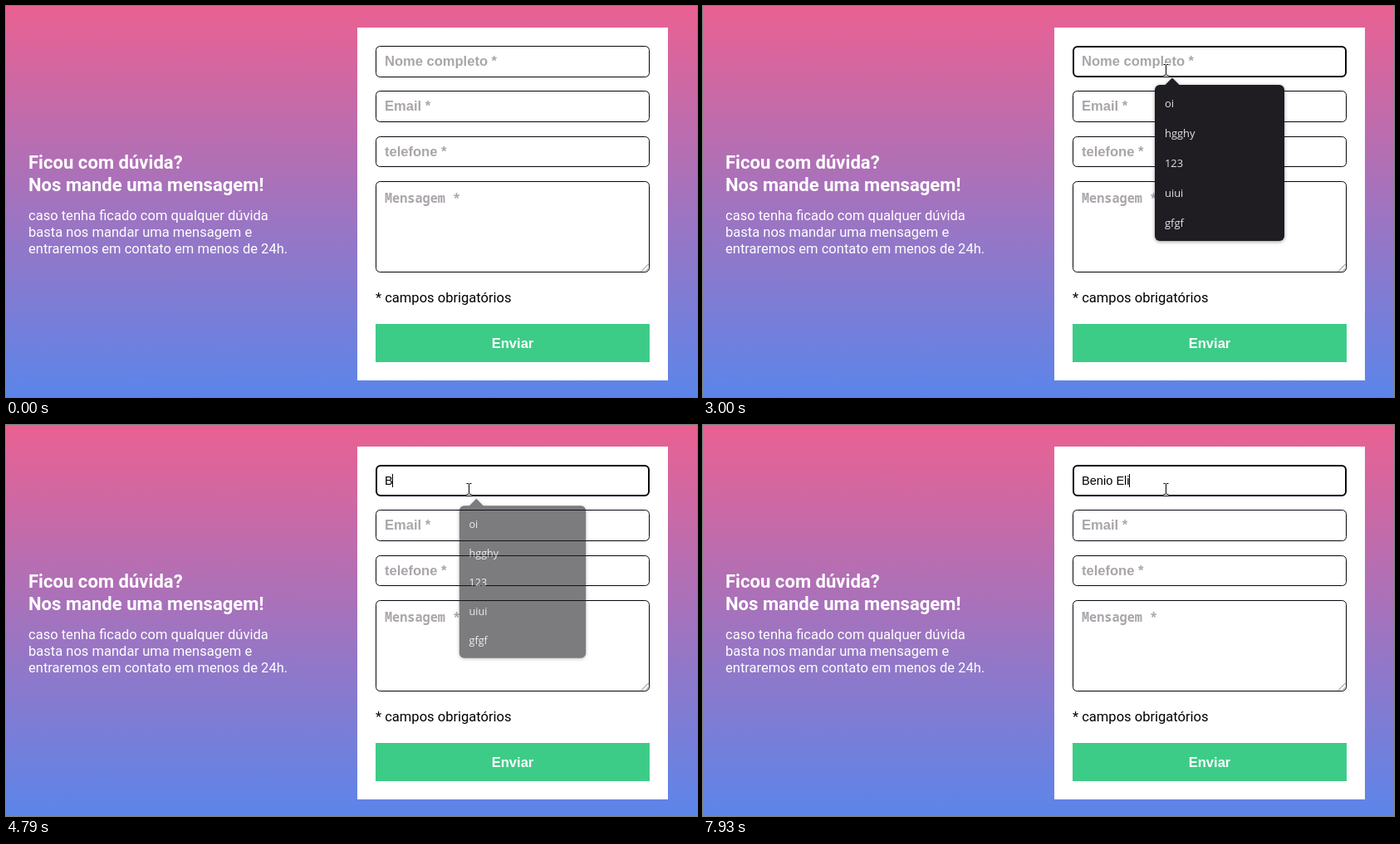
An HTML page that plays this animation: 832 px wide and 471 px high, repeating every 8 s.

```html
<!DOCTYPE html>
<html lang="pt-BR">
<head>
<meta charset="utf-8">
<title>Formulário de contato</title>
<style>
html, body { margin: 0; width: 100%; height: 100%; overflow: hidden; }
svg { display: block; width: 832px; height: 471px; }
text { white-space: pre; }
.copy { font: 16.55px Roboto, sans-serif; }
.title { font: 700 22.1px Roboto, sans-serif; }
.label { font: 700 16.55px "Liberation Sans", Arial, sans-serif; }
.mono { font: 700 15.2px "Noto Sans Mono", monospace; }
.typed { font: 14.6px "Liberation Sans", Arial, sans-serif; }
.option { font: 12.9px "Open Sans", "Noto Sans", sans-serif; }
.hint { fill: #aaa5aa; }
.field { fill: none; stroke: #05050f; }
#popup { transform-origin: 622px 189px; filter: drop-shadow(0 1px 2px #0006); }
</style>
</head>
<body>
<svg viewBox="0 0 832 471">
  <defs>
    <linearGradient id="sky" x2="0" y2="1">
      <stop stop-color="#ea6192"/>
      <stop offset="1" stop-color="#5b85ea"/>
    </linearGradient>
  </defs>
  <rect width="832" height="471" fill="url(#sky)"/>
  <g fill="#fff">
    <text class="title" x="27" y="196">Ficou com dúvida?</text>
    <text class="title" x="27" y="223">Nos mande uma mensagem!</text>
    <text class="copy" x="27" y="258">caso tenha ficado com qualquer dúvida</text>
    <text class="copy" x="27" y="278">basta nos mandar uma mensagem e</text>
    <text class="copy" x="27" y="298">entraremos em contato em menos de 24h.</text>
    <rect x="423" y="26" width="374" height="425"/>
  </g>

  <rect id="name" class="field" x="445.5" y="48.5" width="329" height="37" rx="5"/>
  <rect id="focus" class="field" x="446" y="49" width="328" height="36" rx="5" stroke-width="2"/>
  <rect class="field" x="445.5" y="102.5" width="329" height="37" rx="5"/>
  <rect class="field" x="445.5" y="157.5" width="329" height="36" rx="5"/>
  <rect class="field" x="445.5" y="211.5" width="329" height="109" rx="5"/>
  <path d="M765 319.500L773.500 311M770 319.500L773.500 316" stroke="#777" fill="none"/>

  <text id="nameHint" class="label hint" x="456" y="72">Nome completo *</text>
  <text class="label hint" x="456" y="126">Email *</text>
  <text class="label hint" x="456" y="181">telefone *</text>
  <text class="mono hint" x="456" y="237">Mensagem *</text>
  <text id="typed" class="typed" x="456" y="72"></text>
  <rect id="caret" y="59" width="1" height="16"/>

  <text class="copy" x="445" y="357">* campos obrigatórios</text>
  <rect x="445" y="383" width="330" height="46" fill="#3dcc87"/>
  <text class="label" x="610" y="412" text-anchor="middle" fill="#fff">Enviar</text>

  <g id="popup" fill="#1f1d22">
    <rect x="544" y="95" width="156" height="188" rx="6"/>
    <path d="M555.500 96L565 86.500L574.500 96Z"/>
    <g class="option" fill="#e3e2e5">
      <text x="556" y="122">oi</text>
      <text x="556" y="158">hgghy</text>
      <text x="556" y="194">123</text>
      <text x="556" y="230">uiui</text>
      <text x="556" y="266">gfgf</text>
    </g>
  </g>

  <path id="arrow" d="M.5 .5V16.500L4.200 13L6.800 19L9.300 18L6.800 12H11.500Z" fill="#fff" stroke="#000"/>
  <g id="beam" fill="none">
    <path d="M-2.500-6.500H3.500M.5-6.500V6.500M-2.500 6.500H3.500" stroke="#fff" stroke-width="3"/>
    <path d="M-2.500-6.500H0M1-6.500H3.500M.5-6V6M-2.500 6.500H0M1 6.500H3.500" stroke="#000"/>
  </g>
</svg>
<script>
const $ = id => document.getElementById(id);
const show = (id, on) => $(id).style.visibility = on ? 'visible' : 'hidden';

const entry = 'Benio Eli';
const keyTimes = [4720, 5460, 5790, 6190, 6320, 6650, 7400, 7730, 7930];
const caretOff = [[3000, 3530], [4060, 4590], [5260, 5460], [7200, 7400]];
const fields = [[48, 86], [102, 140], [157, 194], [211, 321]];
// start time, steps, from x, y, to x, y
const moves = [
  [470, 8, 765, 444, 564, 150],
  [1290, 6, 564, 150, 557, 86],
  [1910, 4, 557, 84, 557, 77]
];
const within = (v, [a, b]) => v >= a && v < b;

function pointer(t) {
  const [start, steps, x0, y0, x1, y1] = moves.findLast(m => t >= m[0]);
  const u = Math.min(1, Math.floor((t - start) / 70) / steps);
  const e = 1 - (1 - u) ** 3;
  return [Math.round(x0 + (x1 - x0) * e), Math.round(y0 + (y1 - y0) * e)];
}

function popupAlpha(t) {
  if (t < 2520) return 0;
  if (t < 2650) return .5;
  if (t < 4720) return 1;
  const step = 4720 + Math.floor((t - 4720) / 70) * 70;
  return Math.max(0, 1 - (step - 4700) / 215);
}

function draw(t) {
  const focused = t >= 2450;
  show('name', !focused);
  show('focus', focused);

  const count = keyTimes.filter(k => t >= k).length;
  $('typed').textContent = entry.slice(0, count);
  show('nameHint', !count);
  const width = count ? $('typed').getComputedTextLength() : 0;
  $('caret').setAttribute('x', Math.floor(456 + width));
  show('caret', focused && !caretOff.some(span => within(t, span)));

  const alpha = popupAlpha(t);
  $('popup').style.opacity = alpha;
  $('popup').style.transform = `scale(${.945 + .055 * alpha})`;

  const moving = t >= 470;
  const [x, y] = moving ? pointer(t) : [0, 0];
  const overField = fields.some(f => within(y, f));
  show('arrow', moving && !overField);
  show('beam', moving && overField);
  for (const id of ['arrow', 'beam']) $(id).setAttribute('transform', `translate(${x} ${y})`);
}

const began = performance.now();
function tick() {
  draw((performance.now() - began) % 8000);
  requestAnimationFrame(tick);
}
tick();
</script>
</body>
</html>
```
